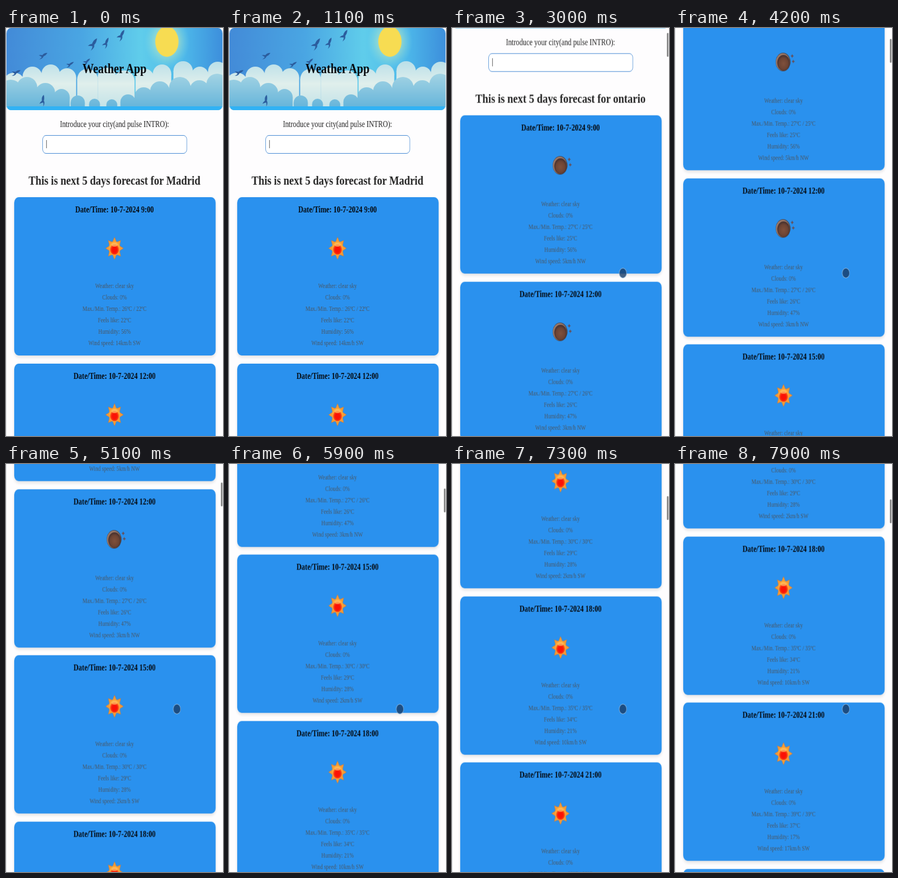
These frames come from a looping animation (400x750 px, 8000 ms). An HTML page:

```html
<!DOCTYPE html>
<html lang="en">
<head>
<meta charset="utf-8">
<title>Weather App</title>
<style>
html, body { margin: 0; width: 100%; height: 100%; overflow: hidden; background: #fff; }
#stage {
  position: absolute; width: 500px; height: 750px; overflow: hidden;
  transform: scale(.8, 1); transform-origin: 0 0;
  font-family: "Liberation Serif", "Times New Roman", serif;
  background: #fefdfe; color: #222; text-align: center;
}
#stage * { box-sizing: border-box; }
#page { position: absolute; left: 0; top: 0; width: 500px; will-change: transform; }
#page > *, .card > * { position: absolute; margin: 0; white-space: nowrap; }
header { left: 1px; top: 0; width: 498px; height: 151px; border-radius: 10px; overflow: hidden; }
header svg { display: block; width: 498px; height: 151px; }
h1 { left: 0; width: 500px; top: 60px; font-size: 26px; line-height: 30px; color: #06080c; }
label { left: 0; width: 500px; top: 167px; font-size: 16px; line-height: 20px; }
#city {
  left: 84px; top: 197px; width: 333px; height: 34px; padding-left: 8px;
  border: 1.3px solid #3f85d2; border-radius: 8px; background: #fff;
  font-size: 14px; line-height: 31px; text-align: left;
}
#city::after {
  content: ""; display: inline-block; width: 1.3px; height: 15px;
  background: #222; vertical-align: -3px;
}
h2 { left: 0; width: 500px; top: 265px; font-size: 24px; line-height: 30px; color: #262626; }
.card {
  left: 18.5px; width: 464px; height: 291px; border-radius: 10px;
  background: #2a91ee; box-shadow: 0 3px 6px rgba(0, 0, 0, .12);
}
.card > * { left: 0; width: 463px; }
.card h3 { top: 13px; font-size: 16px; line-height: 20px; color: #050a10; }
.card svg { left: 196.5px; top: 59px; width: 70px; height: 70px; }
.card p { font-size: 12px; line-height: 20px; color: #4b5865; }
#edge { position: absolute; left: 0; top: 0; width: 1px; height: 750px; background: #d9dde0; }
#thumb { position: absolute; left: 495px; width: 4px; height: 44px; border-radius: 2px; background: #8b8b8b; }
#dot {
  position: absolute; left: -9px; top: -9.5px; width: 18px; height: 19px; border-radius: 50%;
  background: rgba(24, 60, 104, .8); border: 1.4px solid #91b9dd;
}
</style>
</head>
<body>
<div id="stage">
  <div id="page">
    <header>
      <svg viewBox="0 0 400 151" preserveAspectRatio="none">
        <defs>
          <linearGradient id="sky">
            <stop offset="0" stop-color="#438bd8"/><stop offset=".35" stop-color="#4aa6e3"/>
            <stop offset=".62" stop-color="#60cdeb"/><stop offset=".82" stop-color="#4db8ea"/>
            <stop offset="1" stop-color="#3d8fdc"/>
          </linearGradient>
          <linearGradient id="far" gradientUnits="userSpaceOnUse" x1="0" y1="60" x2="0" y2="145">
            <stop offset="0" stop-color="#b9dfe9"/><stop offset=".5" stop-color="#e0efec"/>
            <stop offset="1" stop-color="#c4e3e8"/>
          </linearGradient>
          <linearGradient id="near" gradientUnits="userSpaceOnUse" x1="0" y1="82" x2="0" y2="150">
            <stop offset="0" stop-color="#a5d5e4"/><stop offset="1" stop-color="#62b3da"/>
          </linearGradient>
          <radialGradient id="glow">
            <stop offset=".4" stop-color="#d8f0b0" stop-opacity=".6"/>
            <stop offset="1" stop-color="#8be0e8" stop-opacity="0"/>
          </radialGradient>
          <radialGradient id="hot" cy=".62">
            <stop offset=".45" stop-color="#fb1206"/><stop offset=".72" stop-color="#fa3a12"/>
            <stop offset="1" stop-color="#ffae3c"/>
          </radialGradient>
          <radialGradient id="rock" cx=".5" cy=".55">
            <stop offset="0" stop-color="#80513c"/><stop offset=".7" stop-color="#6d4434"/>
            <stop offset="1" stop-color="#4a3330"/>
          </radialGradient>
        </defs>
        <rect width="400" height="151" fill="url(#sky)"/>
        <ellipse cx="297" cy="25" rx="42" ry="50" fill="url(#glow)"/>
        <ellipse cx="297" cy="25" rx="21.5" ry="28" fill="#f7dc52"/>
        <g id="farClouds" fill="url(#far)"></g>
        <g id="nearClouds" fill="url(#near)"></g>
        <rect y="144" width="400" height="7" fill="#31b2f4"/>
        <g id="birds" fill="#2b5c9d"></g>
      </svg>
    </header>
    <h1>Weather App</h1>
    <label>Introduce your city(and pulse INTRO):</label>
    <div id="city"></div>
    <h2></h2>
  </div>
  <div id="edge"></div>
  <div id="thumb"></div>
  <div id="pointer"><div id="dot"></div></div>
</div>
<script>
const LOOP = 8000, TICK = 100, CARD_TOP = 311, CARD_STEP = 305.5;
const $ = q => document.querySelector(q);

// Header scenery: puffs are [x, y, radius], birds are [x, y, size, angle]
const puffs = list => list.map(([x, y, r]) =>
  `<ellipse cx="${x}" cy="${y}" rx="${r}" ry="${r}"/><rect x="${x - r}" y="${y}" width="${2 * r}" height="${151 - y}"/>`).join('');
$('#farClouds').innerHTML = puffs([[14, 102, 20], [48, 89, 18], [82, 84, 17], [112, 91, 17], [150, 94, 19],
  [186, 90, 17], [218, 97, 19], [256, 92, 17], [288, 84, 17], [327, 79, 18], [358, 87, 16], [391, 80, 18]]);
$('#nearClouds').innerHTML = puffs([[8, 115, 20], [38, 109, 19], [72, 119, 18], [102, 127, 15], [132, 137, 13],
  [163, 140, 10], [195, 141, 10], [225, 136, 14], [254, 126, 17], [284, 116, 18], [321, 110, 20], [357, 114, 18], [390, 104, 20]]);
$('#birds').innerHTML = [[17, 82, .9, 20], [67, 51, .9, 15], [67, 134, 1, -35], [117, 67, .8, 15],
  [148, 62, .8, 5], [160, 30, 1.2, -10], [184, 28, 1, -20], [212, 14, 1.1, -15]].map(([x, y, s, a]) =>
  `<path transform="translate(${x} ${y}) rotate(${a}) scale(${s})" d="M8-8Q2-7-1-1Q-5-1-8 1Q-3 2-1 3Q-2 6-5 9Q2 6 2 1Q6-2 8-8Z"/>`).join('');

const spikes = [...Array(8)].map((_, i) =>
  `<path transform="rotate(${i * 45})" d="M-4.5-12L0-20.5L4.5-12Z"/>`).join('');
const sparkle = (x, y) =>
  `<path transform="translate(${x} ${y})" d="M0-3.5L1.2-1.2L3.8 0L1.2 1.2L0 3.5L-1.2 1.2L-3.8 0L-1.2-1.2Z" fill="#65505a"/>`;
const icons = {
  sun: `<g fill="#f39a36" stroke="#b77a4c" stroke-width=".7">${spikes}</g>
    <circle r="13" fill="#f8a13a"/><circle r="11.5" fill="url(#hot)"/>
    <ellipse cy="-6.5" rx="7" ry="3.5" fill="#ffc46b" opacity=".65"/>`,
  moon: `<circle cx="-1" cy="-2" r="17" fill="#44424b"/><circle cx="-1.5" cy="-2" r="16" fill="#9a7969"/>
    <circle cx="0" cy="-.5" r="14.5" fill="url(#rock)"/>${sparkle(20, -13)}${sparkle(22.5, -3)}`
};

// [icon, max, min, feels like, humidity, wind]
const later = [
  ['sun', 30, 30, 29, 28, '2km/h SW'], ['sun', 35, 35, 34, 21, '10km/h SW'],
  ['sun', 39, 39, 37, 17, '17km/h SW'], ['sun', 38, 38, 36, 18, '15km/h SW']];
const forecasts = {
  Madrid: [['sun', 26, 22, 22, 56, '14km/h SW'], ['sun', 29, 26, 26, 45, '12km/h SW'], ...later],
  ontario: [['moon', 27, 25, 25, 56, '5km/h NW'], ['moon', 27, 26, 26, 47, '3km/h NW'], ...later]
};

function card([icon, max, min, feels, humidity, wind], i) {
  const hour = 9 + 3 * i;
  const rows = ['Weather: clear sky', 'Clouds: 0%', `Max./Min. Temp.: ${max}ºC / ${min}ºC`,
    `Feels like: ${feels}ºC`, `Humidity: ${humidity}%`, `Wind speed: ${wind}`];
  return `<div class="card" style="top:${CARD_TOP + i * CARD_STEP}px">
    <h3>Date/Time: ${10 + Math.floor(hour / 24)}-7-2024 ${hour % 24}:00</h3>
    <svg viewBox="-35 -35 70 70">${icons[icon]}</svg>
    ${rows.map((r, n) => `<p style="top:${153 + n * 21}px">${r}</p>`).join('')}</div>`;
}

let shown = '';
function showCity(name) {
  if (name === shown) return;
  shown = name;
  $('h2').textContent = `This is next 5 days forecast for ${name}`;
  document.querySelectorAll('.card').forEach(c => c.remove());
  $('#page').insertAdjacentHTML('beforeend', forecasts[name].map(card).join(''));
}

// Scroll keys: [time, offset, speed], joined by cubic Hermite curves
const keys = [[2600, 0, .2], [3000, 150.5, .4], [4200, 340.5, .05], [5100, 570.5, .3], [6700, 868.5, .12], [7900, 1094.5, .1]];
function scrollAt(t) {
  if (t <= keys[0][0]) return 0;
  const i = keys.findIndex(k => t <= k[0]);
  const [t0, y0, v0] = keys[i - 1], [t1, y1, v1] = keys[i];
  const d = t1 - t0, u = (t - t0) / d, w = 1 - u;
  return y0 * (1 + 2 * u) * w * w + v0 * d * u * w * w + y1 * u * u * (3 - 2 * u) - v1 * d * u * u * w;
}

function draw(ms) {
  const t = Math.floor(ms % LOOP / TICK) * TICK;
  const y = scrollAt(t);
  showCity(t < 1400 ? 'Madrid' : 'ontario');
  $('#city').textContent = t < 900 ? 'ontario'.slice(0, Math.max(0, t / 100 - 1)) : '';
  $('#page').style.transform = `translateY(${-y}px)`;
  $('#thumb').style.top = `${.2 + y * .0593}px`;
  $('#thumb').style.visibility = y > 0 ? 'visible' : 'hidden';
  const u = Math.min(1, Math.max(0, (t - 2300) / 200)), e = u * u * (3 - 2 * u);
  $('#pointer').style.cssText = `position:absolute;visibility:${t < 1900 ? 'hidden' : 'visible'};` +
    `left:0;top:0;transform:translate(${350 + 43.75 * e}px,${314.5 + 135.5 * e}px)`;
}

const start = performance.now();
(function loop() {
  draw(performance.now() - start);
  requestAnimationFrame(loop);
})();
</script>
</body>
</html>
```
